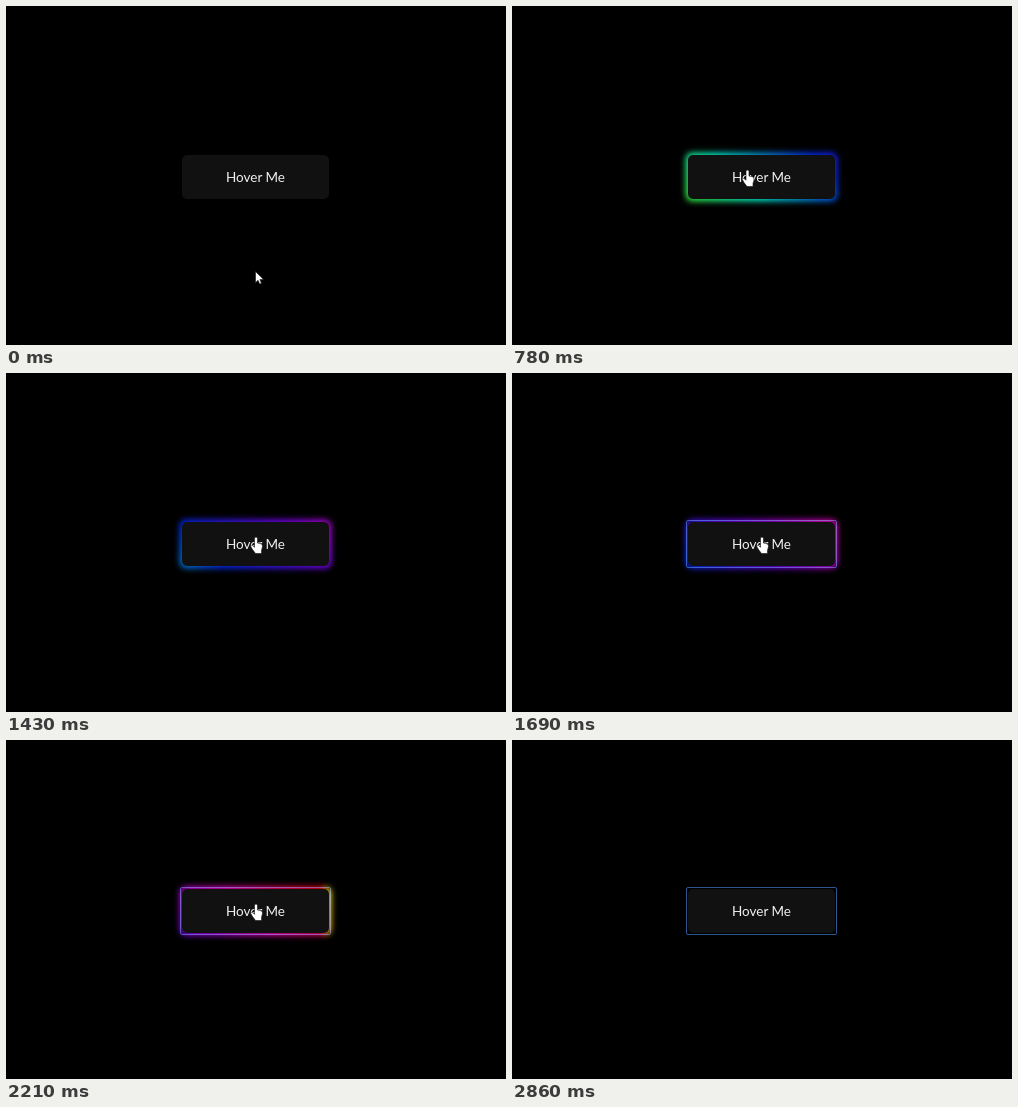
An HTML page that plays this animation: 500x339 px, repeating every 3380 ms.

```html
<!DOCTYPE html>
<html lang="en">
<head>
<meta charset="utf-8">
<style>
html, body { margin: 0; width: 100%; height: 100%; overflow: hidden; background: #000; }
#stage { position: relative; width: 500px; height: 339px; overflow: hidden; background: #000; }
#stage > * { position: absolute; box-sizing: border-box; }
#glow {
  left: 174px; top: 147px; width: 151px; height: 48px; border-radius: 6px;
  background: linear-gradient(45deg, #ff0000, #ff7300, #fffb00, #48ff00, #00ffd5, #002bff, #7a00ff, #ff00c8, #ff0000);
  background-size: 400% 400%;
  filter: blur(3px);
}
#button {
  left: 176px; top: 149px; width: 147px; height: 44px; border-radius: 5px;
  background: #111; color: #f2f2f2;
  font: 13.5px/44px Lato, "Open Sans", sans-serif; text-align: center; white-space: nowrap;
}
#ring {
  left: 174px; top: 147px; width: 151px; height: 48px;
  border: 1px solid #2d5591; border-radius: 2px; mix-blend-mode: screen;
}
#cursor { left: 0; top: 0; width: 500px; height: 339px; }
#cursor path { fill: #fff; stroke: #111; stroke-width: .6; stroke-linejoin: round; }
</style>
</head>
<body>
<div id="stage">
  <div id="glow"></div>
  <div id="button">Hover Me</div>
  <div id="ring"></div>
  <svg id="cursor" viewBox="0 0 500 339">
    <path id="arrow" d="M0 0V11.2L2.5 8.8L4.2 12.6L6 11.8L4.4 8.1H8Z"/>
    <path id="hand" d="M-1.5 1Q0-.8 1.5 1V6L5 6.8Q6.8 7.3 6.5 9.5L5.5 13.5V16.5H-.5L-3.5 12.5L-5.3 9.2Q-4.6 7.6-3 8.8L-1.5 10.3Z"/>
  </svg>
</div>
<script>
const LOOP = 3380, TICK = 130, LAST = 2860;
const CLICK = 1560, ENTER = 300, LEAVE = 2400;
const el = id => document.getElementById(id);
const [glow, ring, arrow, hand] = ["glow", "ring", "arrow", "hand"].map(el);

// Pointer route: time, x, y
const route = [
  [0, 249.5, 265.5], [130, 249.5, 265.5], [260, 244, 215], [390, 237, 170],
  [520, 235.5, 164], [910, 235.5, 164], [1300, 250, 164], [2340, 250, 164],
  [2470, 252, 235], [2600, 254, 327], [2730, 256, 350]
];

const clamp = v => Math.min(1, Math.max(0, v));
const ease = v => v * v * (3 - 2 * v);

function pointer(t) {
  const i = route.findIndex(p => p[0] > t);
  if (i < 0) return route[route.length - 1].slice(1);
  const [t0, x0, y0] = route[i - 1], [t1, x1, y1] = route[i];
  const k = (t - t0) / (t1 - t0);
  return [x0 + (x1 - x0) * k, y0 + (y1 - y0) * k];
}

function draw(now) {
  const t = Math.min(LAST, Math.floor((now % LOOP) / TICK) * TICK);
  const [x, y] = pointer(t);
  const over = y > 148 && y < 193;
  for (const [shape, shown] of [[hand, over], [arrow, !over]]) {
    shape.setAttribute("transform", `translate(${x} ${y})`);
    shape.style.display = shown ? "" : "none";
  }
  glow.style.opacity = ease(clamp((t - ENTER) / 300)) * ease(clamp(1 - (t - LEAVE) / 390));
  glow.style.backgroundPosition = `${-(130 + (t - 520) * 0.195)}px 0`;
  ring.style.display = t >= CLICK ? "" : "none";
}

const start = performance.now();
function frame() {
  draw(performance.now() - start);
  requestAnimationFrame(frame);
}
frame();
</script>
</body>
</html>
```
